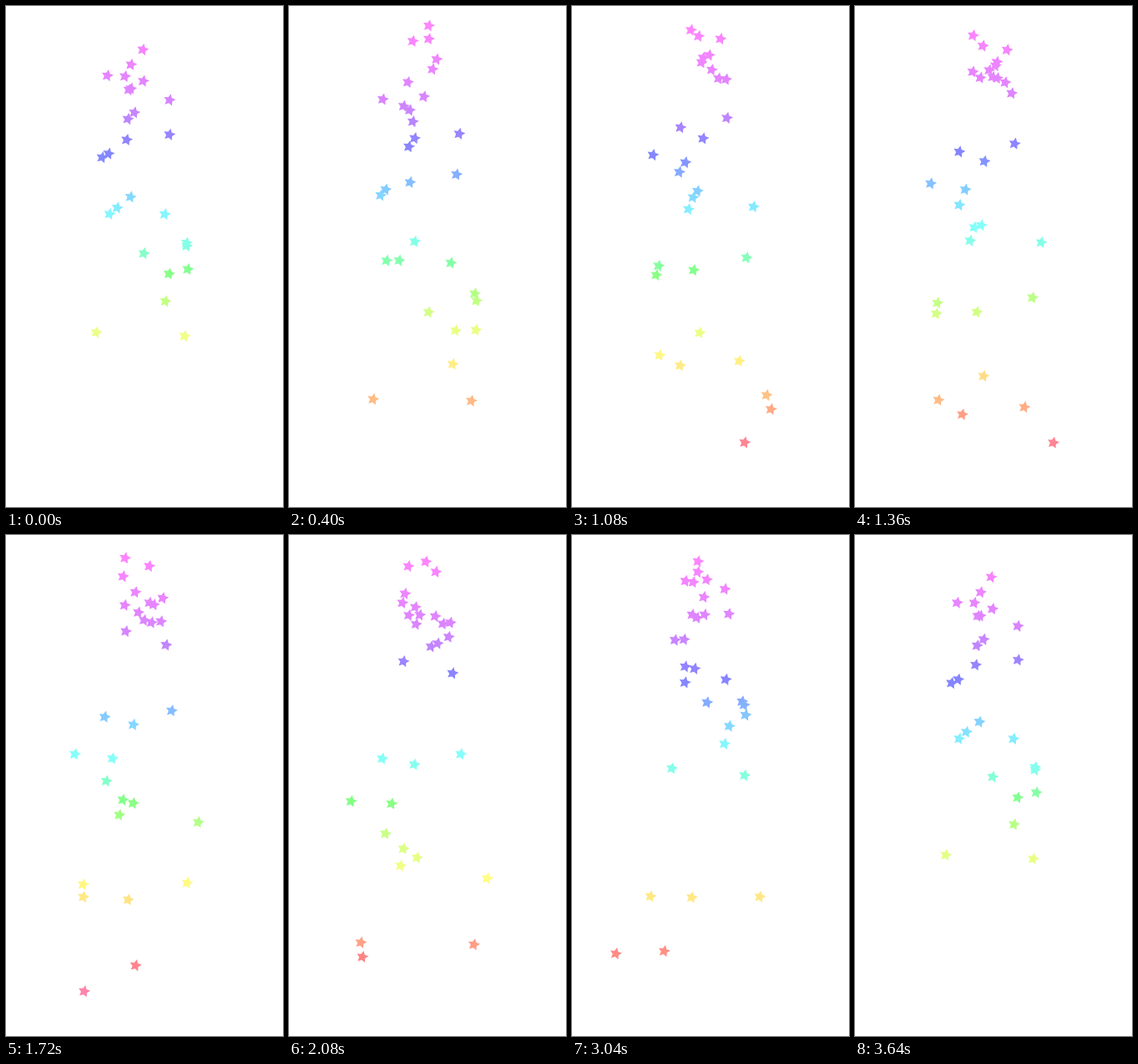
An HTML page with a canvas for the animation above (3.68 s loop, 332 by 600 pixels).

```html
<!DOCTYPE html>
<html lang="en">
<head>
<meta charset="utf-8">
<title>Falling stars</title>
<style>
  html, body { margin: 0; height: 100%; overflow: hidden; background: #fff; }
  canvas { display: block; }
</style>
</head>
<body>
<canvas width="332" height="600"></canvas>
<script>
const ctx = document.querySelector('canvas').getContext('2d');

const LOOP = 3680, STEP = 40, LIFE = 4200;
const HALF_GRAVITY = 2.53e-5; // px per ms²
const HEAD_START = 117;       // ms of falling already done at birth

// start x, drift in px per second, top of the fall
const stars = [
  [174.1, -18.15, 33.7], [174.2, 11.3, 60.6], [146.7, 13.04, 40.7],
  [167.5, 15.35, 23.3], [148.8, 5.16, 24.6], [162.7, 10.73, 68.6],
  [157.9, 20.13, 54.1], [143.2, -3.53, 26.4], [174.4, 15.63, 85.8],
  [166.2, 9.38, 68.1], [167.1, -17.66, 83.7], [141, 3.53, 78.4],
  [142.4, 1.01, 24.4], [170.6, 12.36, 36.3], [140.1, -13.04, 76.4],
  [155, -17.8, 83.9], [162.4, 19.97, 31], [142.5, 2.99, 29.3],
  [161.1, -12.91, 23], [153.9, -5.98, 83.1], [163.4, -8.02, 83.8],
  [146, -22.7, 47.2], [162.1, -12.91, 69.6], [147, 20.11, 29.1],
  [163, -18.34, 52.5], [168.6, -6.91, 76.9]
].map(([x, drift, top], i) => ({
  x, drift, top, birth: 40 + 120 * i + (i > 12 ? 40 : 0)
}));

// height, hue
const hues = [
  [0, 306], [75, 290], [115, 280], [135, 268], [155, 248], [180, 238],
  [215, 208], [250, 184], [285, 168], [320, 119], [355, 88],
  [390, 70], [435, 48], [475, 25], [505, 0], [560, -25]
];

function hueAt(y) {
  const i = hues.findIndex(([h]) => h > y);
  const [y0, a] = hues[i - 1], [y1, b] = hues[i];
  return a + (b - a) * (y - y0) / (y1 - y0);
}

function drawStar(x, y) {
  ctx.beginPath();
  for (let i = 0; i < 10; i++) {
    const r = i % 2 ? 3.75 : 7.5, a = i * Math.PI / 5 - 0.1;
    ctx.lineTo(x + r * Math.cos(a), y + r * Math.sin(a));
  }
  ctx.fillStyle = `hsl(${(hueAt(y) + 360) % 360}, 100%, 76%)`;
  ctx.fill();
}

function drawAtAge(star, age) {
  if (age >= LIFE) return;
  drawStar(star.x + star.drift * age / 1000,
           star.top + HALF_GRAVITY * (age + HEAD_START) ** 2);
}

function frame() {
  const t = Math.floor(performance.now() % LOOP / STEP) * STEP;
  ctx.clearRect(0, 0, 332, 600);
  for (const star of stars) {
    const age = (t - star.birth + LOOP) % LOOP;
    drawAtAge(star, age + LOOP); // still falling from the previous round
    drawAtAge(star, age);
  }
  requestAnimationFrame(frame);
}
frame();
</script>
</body>
</html>
```
